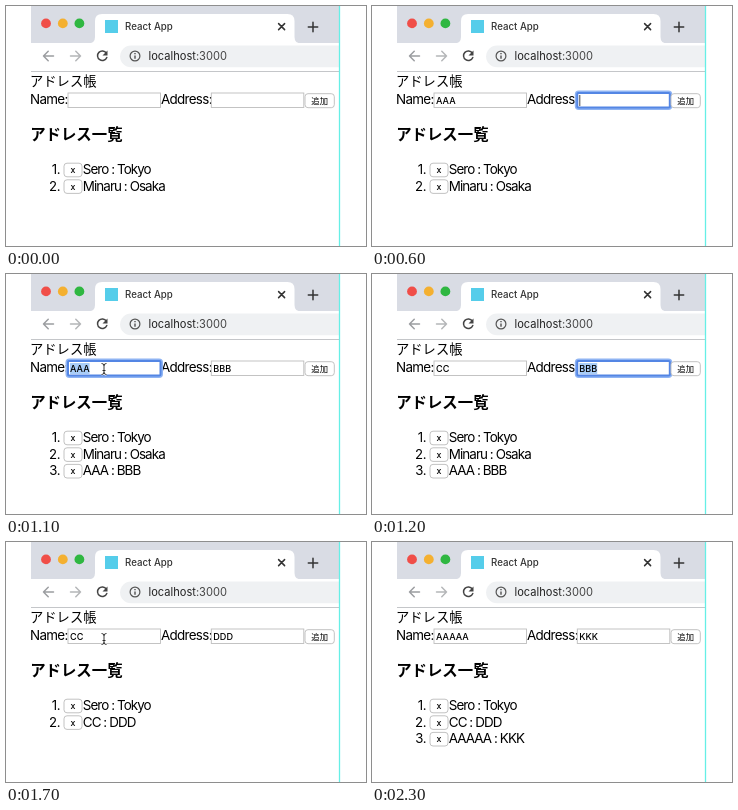
Recreate the animation shown at these times as an HTML page. Size 360 px wide and 240 px high, loop 2.4 s.

```html
<!DOCTYPE html>
<html lang="ja">
<head>
<meta charset="utf-8">
<title>アドレス帳</title>
<style>
html, body { margin: 0; width: 100%; height: 100%; overflow: hidden; background: #fff; }
svg { display: block; width: 100vw; height: 100vh; }
text { font-family: Inter, "Noto Sans CJK JP", "Noto Sans CJK", sans-serif; fill: #000; white-space: pre; }
.body { font-size: 13.4px; letter-spacing: -.68px; }
.row { font-size: 13.4px; letter-spacing: -.92px; }
.number { font-size: 13.2px; letter-spacing: -.2px; }
.jp { font-family: "Noto Sans CJK JP", "Noto Sans CJK", sans-serif; }
.small { font-size: 9.1px; font-weight: 500; }
.line { fill: none; stroke-width: 1.5; stroke-linecap: round; stroke-linejoin: round; }
</style>
</head>
<body>
<svg viewBox="0 0 360 240">
  <rect width="360" height="240" fill="#fff"/>
  <rect x="25" width="308" height="37" fill="#d9dce4"/>
  <path d="M82 37.5Q89 37.5 89 31V15Q89 8 96 8H281.5Q288.5 8 288.5 15V31Q288.5 37.5 295.5 37.5Z" fill="#fff"/>
  <circle cx="40" cy="17.4" r="4.9" fill="#f04e48"/>
  <circle cx="56.8" cy="17.4" r="4.9" fill="#f4b030"/>
  <circle cx="73.4" cy="17.4" r="4.9" fill="#2fb741"/>
  <rect x="99" y="14" width="13" height="13" fill="#55cdea"/>
  <text x="119" y="24.3" font-size="9.7" font-weight="500" style="fill:#333">React App</text>
  <path class="line" d="M272.6 17.6l6 6m0-6l-6 6" stroke="#333"/>
  <path class="line" d="M302.3 21h9.4m-4.7-4.7v9.4" stroke="#333"/>

  <path class="line" d="M47.5 50H37.5m4.7-4.7L37.5 50l4.7 4.7" stroke="#9b9da0"/>
  <path class="line" d="M64.5 50h10m-4.7-4.7l4.7 4.7-4.7 4.7" stroke="#b4b6b8"/>
  <path class="line" d="M100.3 47A4.8 4.8 0 1 0 100.8 51.5" stroke="#444"/>
  <path d="M101.5 44.5v5h-5z" fill="#444"/>
  <path d="M333 39.5H125a10.9 10.9 0 0 0 0 21.8H333Z" fill="#eff1f3"/>
  <circle class="line" cx="129" cy="50" r="4.9" stroke="#555" style="stroke-width:1.2"/>
  <path d="M129 49.5v3.2m0-5.6v1.2" stroke="#444" stroke-width="1.3"/>
  <text x="142.5" y="54" font-size="11.1" style="fill:#222">localhost<tspan fill="#444">:3000</tspan></text>
  <path d="M25 65.5H333" stroke="#c4c6c9"/>

  <text class="jp" x="24" y="79.9" font-size="13.3">アドレス帳</text>
  <text class="body" x="24" y="98.2">Name:</text>
  <text class="body" x="155" y="98.2">Address:</text>
  <text class="jp" x="24.2" y="134" font-size="15.4" font-weight="700">アドレス一覧</text>
  <g id="form"></g>
  <g id="list"></g>
  <g id="pointer"></g>
  <path d="M333.5 0V240" stroke="#66efe6" stroke-width="1.3"/>
</svg>
<script>
const DURATION = 2400;
const byId = id => document.getElementById(id);

const seed = ["Sero : Tokyo", "Minaru : Osaka"];
const added = [...seed, "AAA : BBB"];
const all = [...added, "CC : DDD"];
const kept = [seed[0], "CC : DDD"];

// Each step carries on whatever it does not override.
const steps = [
  { at: 0, name: "", address: "", focus: "", selected: false, pointer: null, rows: seed },
  { at: 100, pointer: ["beam", 134, 99] },
  { at: 200, pointer: ["beam", 112, 92.5] },
  { at: 300, focus: "name" },
  { at: 400, name: "A", pointer: null },
  { at: 500, name: "AAA" },
  { at: 600, focus: "address" },
  { at: 700, address: "BBB" },
  { at: 800, pointer: ["arrow", 296, 104] },
  { at: 900, pointer: ["arrow", 309.5, 95] },
  { at: 1000, focus: "", rows: added },
  { at: 1100, focus: "name", selected: true, pointer: ["beam", 98, 95] },
  { at: 1200, name: "CC", focus: "address", pointer: null },
  { at: 1300, address: "DDD", selected: false },
  { at: 1400, focus: "", rows: all, pointer: ["arrow", 310, 95] },
  { at: 1500, pointer: ["arrow", 67, 180] },
  { at: 1600, rows: kept },
  { at: 1700, pointer: ["beam", 98, 97] },
  { at: 1800, focus: "name", selected: true },
  { at: 1900, name: "AAAAA", selected: false, pointer: null },
  { at: 2000, focus: "address", pointer: ["beam", 225, 93] },
  { at: 2100, address: "KKK", pointer: null },
  { at: 2200, pointer: ["arrow", 310, 95] },
  { at: 2300, focus: "", rows: [...kept, "AAAAA : KKK"], pointer: null }
];

const button = (x, y, width, height, label, size) => `
  <rect x="${x}" y="${y}" width="${width}" height="${height}" rx="3" fill="#fff" stroke="#bbb" stroke-width=".9"/>
  <text x="${x + width / 2}" y="${y + height / 2 + 3}" font-size="${size}" font-weight="500" text-anchor="middle">${label}</text>`;

const field = (x, id) => `
  <rect id="${id}-glow" x="${x - 0.5}" y="86.5" width="93.5" height="15.5" rx="2"
    fill="none" stroke="#8fb4f3" stroke-width="4"/>
  <rect id="${id}-box" x="${x}" y="87" width="92.5" height="14.5" fill="#fff"/>
  <rect id="${id}-mark" x="${x + 2}" y="89" height="11" fill="#a9cdf8"/>
  <text class="small" id="${id}" x="${x + 2}" y="98"></text>
  <path id="${id}-caret" d="M0 89v11" stroke="#333" stroke-width=".9"/>`;

const beam = "M-2.5-5.5Q0-5.5 0-3.5Q0-5.5 2.5-5.5M0-4V4M-2.5 5.5Q0 5.5 0 3.5Q0 5.5 2.5 5.5M-1.5 1.5h3";
const shapes = {
  beam: `<path d="${beam}" fill="none" stroke="#fff" stroke-width="2.2"/>
    <path d="${beam}" fill="none" stroke="#222" stroke-width=".9"/>`,
  arrow: `<path d="M0 0V11.8L2.7 9.2L4.6 13.3L6.7 12.3L4.9 8.4H8.5Z" fill="#000" stroke="#fff" stroke-width=".9"/>`
};

byId("form").innerHTML = field(62, "name") + field(205.3, "address") + button(299, 87.7, 29.3, 14, "追加", 8.3);

function drawField(id, x, state) {
  const focused = state.focus === id;
  const text = byId(id);
  text.textContent = state[id];
  const width = state[id] ? text.getComputedTextLength() : 0;
  const box = byId(id + "-box");
  box.setAttribute("stroke", focused ? "#5486e4" : "#bdbdbd");
  box.setAttribute("stroke-width", focused ? 2 : 0.9);
  box.setAttribute("rx", focused ? 1 : 0);
  byId(id + "-glow").setAttribute("opacity", focused ? 1 : 0);
  byId(id + "-mark").setAttribute("width", focused && state.selected ? width : 0);
  const caret = byId(id + "-caret");
  caret.setAttribute("transform", `translate(${x + 2.5 + width})`);
  caret.setAttribute("opacity", focused && !state.selected ? 1 : 0);
}

function drawRow(label, i) {
  const y = 163.5 + i * 16.6;
  return `<text class="number" x="54.4" y="${y + 4.6}" text-anchor="end">${i + 1}.</text>
    ${button(58, y - 6.3, 18, 13.6, "x", 8.8)}
    <text class="row" x="76.8" y="${y + 4.6}">${label}</text>`;
}

function render(time) {
  const state = Object.assign({}, ...steps.filter(step => step.at <= time));
  drawField("name", 62, state);
  drawField("address", 205.3, state);
  byId("list").innerHTML = state.rows.map(drawRow).join("");
  const [kind, x, y] = state.pointer || [];
  byId("pointer").innerHTML = kind ? `<g transform="translate(${x} ${y})">${shapes[kind]}</g>` : "";
}

const start = performance.now();
function tick() {
  render((performance.now() - start) % DURATION);
  requestAnimationFrame(tick);
}
tick();
</script>
</body>
</html>
```
